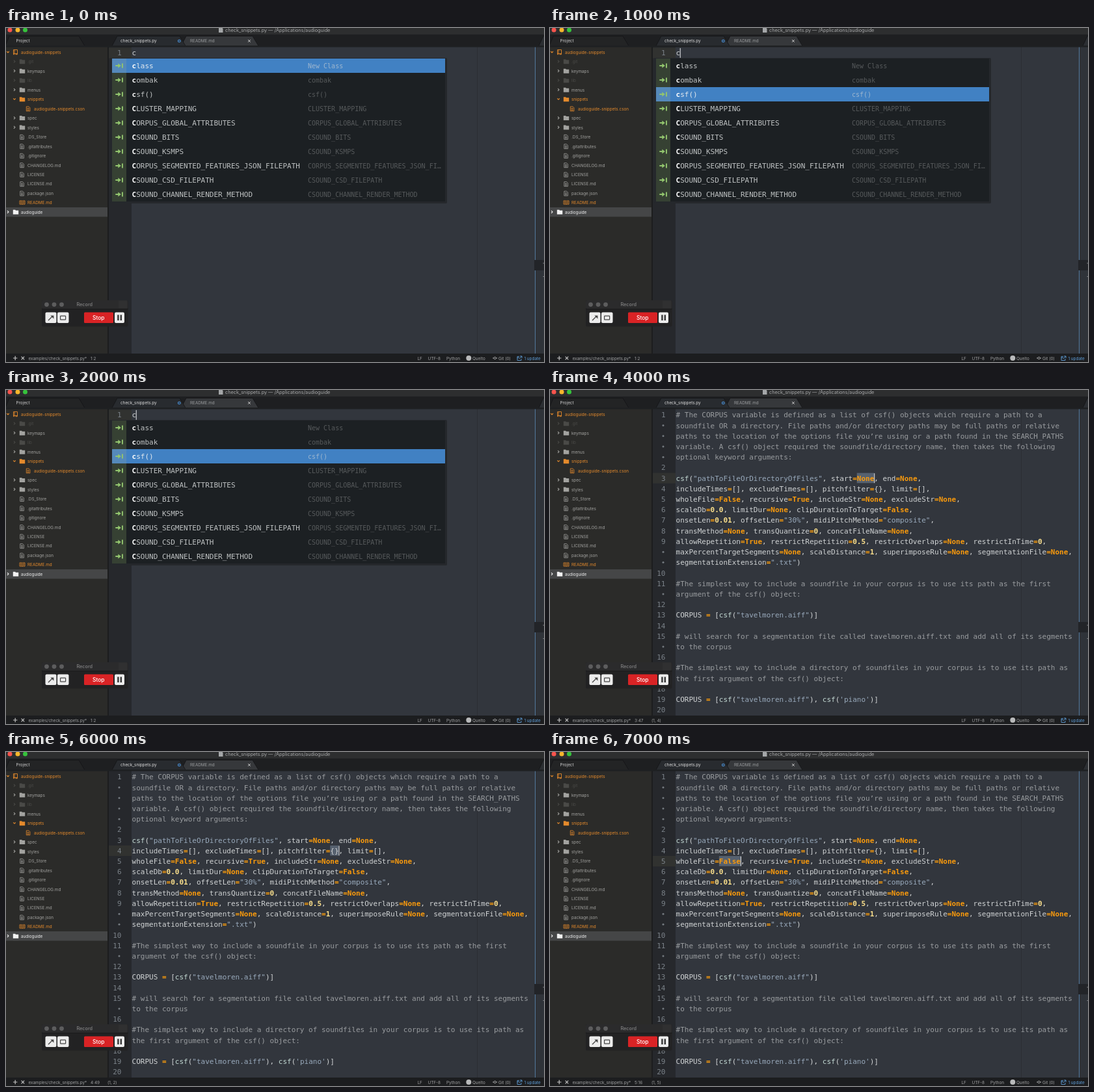
An HTML page that plays this animation: 827x514 px, repeating every 8 s.

```html
<!DOCTYPE html>
<html lang="en">
<head>
<meta charset="utf-8">
<title>Snippet completion</title>
<style>
html, body { margin: 0; width: 100%; height: 100%; overflow: hidden; background: #1c1d1f; }
svg { display: block; width: 827px; height: 514px; }
text { font-family: Inter, sans-serif; white-space: pre; }
.mono { font-family: "DejaVu Sans Mono", monospace; }
.slot, .list, .code, .pick { animation: 8s step-end infinite; }
.slot { animation-name: slot; animation-delay: calc(var(--at) * 1s - 8s); }
.list { animation-name: list; }
.code { animation-name: code; }
.pick { animation-name: pick; }
@keyframes slot { 0% { opacity: 1 } 12.5%, 100% { opacity: 0 } }
@keyframes list { 0% { opacity: 1 } 37.5%, 100% { opacity: 0 } }
@keyframes code { 0% { opacity: 0 } 37.5%, 100% { opacity: 1 } }
@keyframes pick { 0% { opacity: 0 } 12.5% { opacity: 1 } 37.5%, 100% { opacity: 0 } }
</style>
</head>
<body>
<svg id="stage" viewBox="0 0 827 514"></svg>
<script>
const CHAR = 6.622, LEFT = 193.6, ROW = 16.21, TOP = 38.4;
const UI = 6.35;
const rowY = i => TOP + i * ROW;
const esc = s => s.replace(/&/g, '&amp;').replace(/</g, '&lt;');

const rect = (x, y, w, h, fill, more = '') =>
  `<rect x="${x}" y="${y}" width="${w}" height="${h}" fill="${fill}" ${more}/>`;
const circle = (x, y, r, fill) => `<circle cx="${x}" cy="${y}" r="${r}" fill="${fill}"/>`;
const shape = (d, fill) => `<path d="${d}" fill="${fill}"/>`;
const line = (d, stroke, w = 1) => `<path d="${d}" fill="none" stroke="${stroke}" stroke-width="${w}"/>`;
const group = (cls, body, at = 0) => `<g class="${cls}" style="--at:${at}">${body}</g>`;
// y is the middle of the line of text
const label = (x, y, s, fill, size = UI, more = '') =>
  `<text x="${x}" y="${y + size * .36}" font-size="${size}" fill="${fill}" ${more}>${esc(s)}</text>`;
const mono = (x, y, body, fill, size = 11, more = '') =>
  `<text class="mono" x="${x}" y="${y + size * .36}" font-size="${size}" fill="${fill}" ${more}>${body}</text>`;

const fileIcon = (x, y, c) =>
  line(`M${x - 2.7} ${y - 3.5}h3.8l1.8 1.8v5.2h-5.6z M${x - 1.5} ${y - .9}h3 M${x - 1.5} ${y + .6}h3 M${x - 1.5} ${y + 2.1}h3`, c, .8);
const folder = (x, y, c) =>
  shape(`M${x - 4.2} ${y - 3.8}h3.4l.8 1h4.2v6h-8.4z`, c);
const chevron = (x, y, c, open) =>
  line(open ? `M${x - 1.8} ${y - 1.6}l1.8 1.9l1.8 -1.9` : `M${x - 1} ${y - 2.4}l1.9 1.9l-1.9 1.9`, c, 1.1);
const bookIcon = (x, y, c) =>
  line(`M${x - 4} ${y - 2.8}h3.4l.6 .6l.6 -.6h3.4v5.4h-3.4l-.6 .6l-.6 -.6h-3.4z M${x} ${y - 2}v5 M${x - 3} ${y - 1}h2 M${x - 3} ${y + .8}h2 M${x + 1} ${y - 1}h2 M${x + 1} ${y + .8}h2`, c, .8);
const repoIcon = (x, y, c) =>
  line(`M${x - 3} ${y - 3.6}h6v6h-6z M${x - 1.4} ${y - 3.6}v6 M${x - 3} ${y + 2}v1.6h1.5 M${x + 3} ${y + 2}v1.6h-3`, c, .9);

function header() {
  const tab = (d, fill) => `<path d="${d}" fill="${fill}" stroke="#131416" stroke-width=".8"/>`;
  return rect(0, 0, 827, 10, '#2d2e2f') + rect(0, 10, 827, 17, '#1e1f21') +
    circle(6, 3, 3.5, '#f7544d') + circle(18, 3, 3.5, '#f6b62c') + circle(29.5, 3, 3.5, '#36c23c') +
    shape('M327 -1h4.5l2 2v6h-6.5z', '#a5a7a9') +
    label(337, 3.2, 'check_snippets.py — /Applications/audioguide', '#a9aaab', 7.3) +
    tab('M-1 27.5L5 12.5H112L121 27.5z', '#232425') +
    label(15.5, 20, 'Project', '#d2d2d2') +
    tab('M269 27.5L277 12.5H379L388 27.5z', '#36383b') +
    tab('M163 27.5L171 12.5H267L276 27.5z', '#282b2f') +
    label(176, 20, 'check_snippets.py', '#dddddd') +
    `<circle cx="266.3" cy="20" r="1.8" fill="none" stroke="#4b93dc" stroke-width="1.1"/>` +
    label(283, 20, 'README.md', '#9a9c9e') + line('M372 18l3.8 3.8m0 -3.8l-3.8 3.8', '#c6c6c6', 1) +
    tab('M819 27.5L826 12.5H829V27.5z', '#2b2e32') +
    rect(0, 27, 827, 2.5, '#1e2022');
}

function sidebar() {
  const orange = '#e48a2c', grey = '#a3a3a0', dim = '#4a4a47';
  // [text, kind, colour, open]
  const rows = [
    ['audioguide-snippets', 'root', orange, 1], ['.git', 'dir', dim], ['keymaps', 'dir', grey],
    ['lib', 'dir', dim], ['menus', 'dir', grey], ['snippets', 'dir', orange, 1],
    ['audioguide-snippets.cson', 'sub', orange], ['spec', 'dir', grey], ['styles', 'dir', grey],
    ...['.DS_Store', '.gitattributes', '.gitignore', 'CHANGELOG.md', 'LICENSE', 'LICENSE.md', 'package.json']
      .map(s => [s, 'file', grey]),
    ['README.md', 'book', orange], ['audioguide', 'top', '#f2f2f2'],
  ];
  const draw = {
    root: (y, c) => chevron(3, y, c, 1) + repoIcon(14.5, y - .5, c),
    top: (y, c) => chevron(3, y, c) + folder(15, y, c),
    dir: (y, c, open) => chevron(13, y, c, open) + folder(25, y, c),
    sub: (y, c) => fileIcon(34, y, c),
    file: (y, c) => fileIcon(24.5, y, c),
    book: (y, c) => bookIcon(25, y - .5, c),
  };
  const textX = { root: 23, top: 23, sub: 43 };
  return rect(0, 29, 157, 472, '#2b2b29') + rect(156, 29, 2, 472, '#1c1d1e') +
    rect(0, 276, 156, 14.5, '#454647') +
    rows.map(([s, kind, c, open], i) => {
      const y = 37.6 + i * 14.47;
      return draw[kind](y, c, open) + label(textX[kind] || 33, y, s, c);
    }).join('');
}

const pane = () =>
  rect(158, 29, 35, 472, '#26282c') + rect(193, 29, 634, 472, '#32363d') +
  rect(724, 29, .8, 472, '#2a2d33') + rect(814, 29, 13, 472, '#2f3339') +
  rect(813, 29, 1, 328, '#53789c') + rect(813, 373, 1, 128, '#53789c') +
  rect(812, 357, 15, 16, '#222428') + rect(825.5, 361.5, 1.5, 1, '#8a8c8f') + rect(825.5, 382, 1.5, 1, '#8a8c8f');

const statusBar = () => {
  const c = '#a2a3a4', blue = '#5f9fda', y = 508.4;
  return rect(0, 501, 827, 13, '#1c1d1f') +
    line('M11 508h6.4m-3.2 -3.2v6.4', '#c4c4c4', 1.2) + line('M23.6 505.7l4.6 4.6m0 -4.6l-4.6 4.6', '#c4c4c4', 1.2) +
    label(34.5, y, 'examples/check_snippets.py*', c) +
    label(632.5, y, 'LF', c) + label(648.5, y, 'UTF-8', c) + label(677, y, 'Python', c) +
    circle(711.3, 508, 4, '#b9babb') + label(717, y, 'Quelto', c) +
    line('M748 508h1.8m3.6 0h1.8', c, 1) + `<circle cx="751.6" cy="508" r="1.7" fill="none" stroke="${c}"/>` +
    label(757, y, 'Git (0)', c) +
    line('M789 505.5h-3v6h6v-2.5 M786 507.5h3 M790 505h3v3 M793 505l-4 4', blue, .9) +
    label(796.5, y, '1 update', blue);
};

const position = (pos, len) =>
  label(130, 508.4, pos, '#a2a3a4') + (len ? label(156, 508.4, `(1, ${len})`, '#a2a3a4') : '');

const cursor = (x, y) => rect(x, y - 7.5, 1, 15, '#e6e8ea');
const activeRow = y => rect(158, y - 8.1, 35, ROW, '#313230');

// one tab stop: its line number, code row, first column and length
function stop(at, n, row, col, len, caret = true) {
  const x = LEFT + col * CHAR, w = len * CHAR, y = rowY(row);
  return group('slot', activeRow(y) + rect(x, y - 8, w, 15.6, '#56616f') +
    (caret ? cursor(x + w, y) : '') + position(`${n}:${col + len + 1}`, len), at);
}

const source = [
  '# The CORPUS variable is defined as a list of csf() objects which require a path to a',
  '+soundfile OR a directory. File paths and/or directory paths may be full paths or relative',
  '+paths to the location of the options file you’re using or a path found in the SEARCH_PATHS',
  '+variable. A csf() object required the soundfile/directory name, then takes the following',
  '+optional keyword arguments:',
  '',
  'csf("pathToFileOrDirectoryOfFiles", start=None, end=None,',
  'includeTimes=[], excludeTimes=[], pitchfilter={}, limit=[],',
  'wholeFile=False, recursive=True, includeStr=None, excludeStr=None,',
  'scaleDb=0.0, limitDur=None, clipDurationToTarget=False,',
  'onsetLen=0.01, offsetLen="30%", midiPitchMethod="composite",',
  'transMethod=None, transQuantize=0, concatFileName=None,',
  'allowRepetition=True, restrictRepetition=0.5, restrictOverlaps=None, restrictInTime=0,',
  '+maxPercentTargetSegments=None, scaleDistance=1, superimposeRule=None, segmentationFile=None,',
  '+segmentationExtension=".txt")',
  '',
  '#The simplest way to include a soundfile in your corpus is to use its path as the first',
  '+argument of the csf() object:',
  '',
  'CORPUS = [csf("tavelmoren.aiff")]',
  '',
  '# will search for a segmentation file called tavelmoren.aiff.txt and add all of its segments',
  '+to the corpus',
  '',
  '#The simplest way to include a directory of soundfiles in your corpus is to use its path as',
  '+the first argument of the csf() object:',
  '',
  'CORPUS = [csf("tavelmoren.aiff"), csf(\'piano\')]',
  '',
];

function paint(s) {
  const ink = t => /^["']/.test(t) ? '#98a9bb' : /^\d/.test(t) ? '#fbe08c' : t === 'csf' ? '#c3d9d3' : '#fb9b0c';
  const weight = t => /^(\d|=|None|True|False)/.test(t) ? 700 : 400;
  return s.replace(/"[^"]*"|'[^']*'|\b\d+(\.\d+)?|\b(None|True|False|csf)\b|=/g,
    t => `<tspan fill="${ink(t)}" font-weight="${weight(t)}">${t}</tspan>`);
}

function listing() {
  let n = 0, comment = false;
  return source.map((raw, i) => {
    const wrapped = raw[0] === '+', s = wrapped ? raw.slice(1) : raw, y = rowY(i);
    if (!wrapped) { n++; comment = s[0] === '#'; }
    const mark = wrapped ? circle(174, y, 1.5, '#747a80')
      : mono(177.5, y, n, '#7b8289', 11, 'text-anchor="end"');
    return mark + mono(LEFT, y, comment ? s : paint(s), comment ? '#999c9f' : '#d0d3d4');
  }).join('');
}

const options = ['class', 'combak', 'csf()', 'CLUSTER_MAPPING', 'CORPUS_GLOBAL_ATTRIBUTES', 'CSOUND_BITS',
  'CSOUND_KSMPS', 'CORPUS_SEGMENTED_FEATURES_JSON_FILEPATH', 'CSOUND_CSD_FILEPATH', 'CSOUND_CHANNEL_RENDER_METHOD'];

function option(i, on) {
  const s = options[i], y = 58 + i * 22;
  const hint = i ? (s.length > 34 ? s.slice(0, 33) + '…' : s) : 'New Class';
  return rect(163, y - 11, 512, 22, on ? '#4181c3' : '#1c2023') +
    rect(163, y - 11, 22, 22, on ? '#5589ba' : '#364133') +
    shape(`M168.3 ${y - 1}h4v-2.4l4.6 3.4l-4.6 3.4v-2.4h-4z M178 ${y - 3.4}h1.9v6.8h-1.9z`, '#92c56e') +
    mono(LEFT, y, `<tspan font-weight="700" fill="#fff">${s[0]}</tspan>${s.slice(1)}`, on ? '#e3e9ee' : '#bfc2c3') +
    mono(464, y, hint, on ? '#9db6cf' : '#56595b', 10);
}

const popup = () =>
  rect(160, 46, 518, 224, '#25282c', 'rx="2"') +
  options.map((_, i) => option(i)).join('') +
  group('slot', option(0, true), 0) + group('pick', option(2, true));

const completion = () =>
  activeRow(TOP) + mono(177.5, TOP, '1', '#7b8289', 11, 'text-anchor="end"') +
  mono(LEFT, TOP, 'c', '#d0d3d4') + group('pick', cursor(LEFT + CHAR - .5, TOP)) +
  popup() + position('1:2');

const recorder = () =>
  rect(55, 419, 132.5, 40.5, '#222223', 'rx="2"') + rect(55, 419, 132.5, 13, '#2b2b2c', 'rx="2"') +
  rect(173, 419.5, 13, 12, '#303031') + rect(55, 432, 132.5, .8, '#18181a') +
  [62.5, 74, 85.5].map(x => circle(x, 425.6, 3.4, '#5d5d5e')).join('') +
  label(108.5, 425.8, 'Record', '#8f8f90', 7.3) +
  [[60.5, 17], [79, 17.5], [167, 15]].map(([x, w]) => rect(x, 437.5, w, 16.5, '#ececec', 'rx="2"')).join('') +
  line('M65 450l6 -6', '#444', 1.2) + shape('M68.4 442.4h5v5z', '#444') +
  rect(83.6, 443.2, 8, 5.6, 'none', 'stroke="#444" stroke-width="1.2" rx=".6"') +
  rect(120, 437.5, 45, 16.5, '#d92325', 'rx="1.5"') +
  label(133, 445.6, 'Stop', '#fff', 8.4, 'font-weight="500"') +
  rect(171.2, 441.5, 2.4, 8.5, '#333') + rect(175.6, 441.5, 2.4, 8.5, '#333');

document.getElementById('stage').innerHTML =
  pane() + sidebar() + header() + statusBar() +
  stop(3, 3, 6, 4, 30, false) + stop(4, 3, 6, 42, 4) + stop(5, 4, 7, 13, 2) +
  stop(6, 4, 7, 46, 2) + stop(7, 5, 8, 10, 5) +
  group('code', listing()) + group('list', completion()) + recorder();
</script>
</body>
</html>
```
